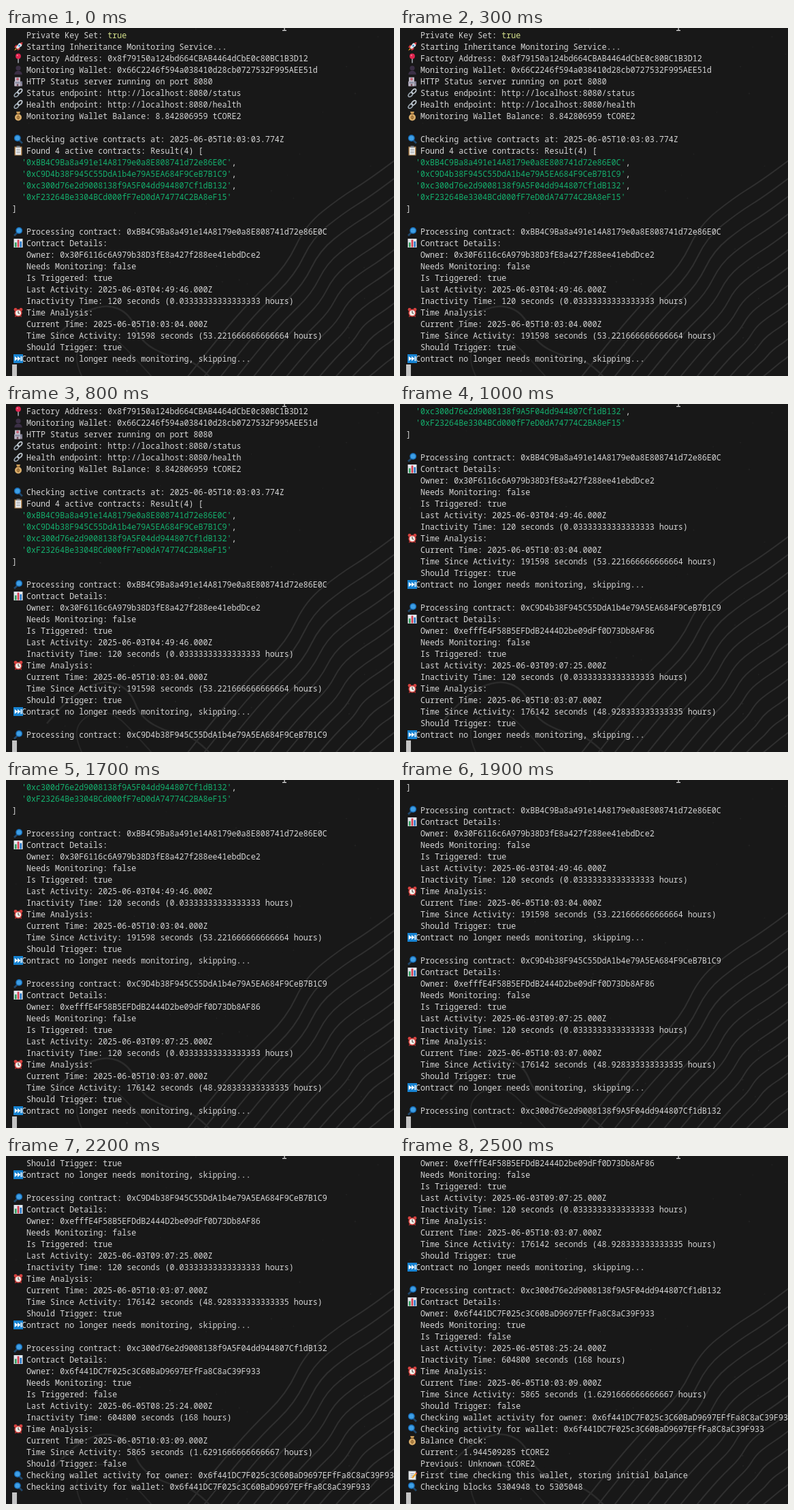
Write an HTML page with a canvas that moves like this. It is 570x512 px and loops after 2.6 s.

```html
<!DOCTYPE html>
<html lang="en">
<head>
<meta charset="utf-8">
<title>Monitoring service log</title>
<style>
html, body { margin: 0; height: 100%; overflow: hidden; background: #181818; }
canvas { display: block; }
</style>
</head>
<body>
<canvas id="stage" width="570" height="512"></canvas>
<script>
const ctx = document.getElementById('stage').getContext('2d');
const W = 570, H = 512, LOOP = 2600, ROW = 17, COL = 7.015, LEFT = 9, ROWS = 29;
const TEXT = '#d6d6d6', GREEN = '#14b06e', YELLOW = '#d6e28c';

// Shape helpers
function dot(color, x, y, r) {
  ctx.fillStyle = color;
  ctx.beginPath();
  ctx.arc(x, y, r, 0, 7);
  ctx.fill();
}
function box(color, x, y, w, h) {
  ctx.fillStyle = color;
  ctx.fillRect(x, y, w, h);
}
function poly(color, ...p) {
  ctx.fillStyle = color;
  ctx.beginPath();
  for (let i = 0; i < p.length; i += 2) ctx.lineTo(p[i], p[i + 1]);
  ctx.fill();
}
function ring(color, width, x, y, rx, ry = rx, turn = 0) {
  ctx.strokeStyle = color;
  ctx.lineWidth = width;
  ctx.beginPath();
  ctx.ellipse(x, y, rx, ry, turn, 0, 7);
  ctx.stroke();
}
function line(color, width, ...p) {
  ctx.strokeStyle = color;
  ctx.lineWidth = width;
  ctx.beginPath();
  for (let i = 0; i < p.length; i += 2) ctx.lineTo(p[i], p[i + 1]);
  ctx.stroke();
}
function smooth(color, width, pts) {
  ctx.strokeStyle = color;
  ctx.lineWidth = width;
  ctx.beginPath();
  ctx.moveTo(...pts[0]);
  for (let i = 1; i < pts.length - 1; i++) {
    const [x, y] = pts[i], [nx, ny] = pts[i + 1];
    const last = i === pts.length - 2;
    ctx.quadraticCurveTo(x, y, last ? nx : (x + nx) / 2, last ? ny : (y + ny) / 2);
  }
  ctx.stroke();
}

function lens(x, handleX) {
  line('#20486c', 2.8, x, 6, handleX, 13);
  dot('#1769b0', x, 5.5, 5);
  dot('#3e9fe6', x, 5.5, 3.6);
}
function sheet(paper, frame) {
  box(frame, 1.5, 1, 11, 13);
  box(paper, 3, 2.5, 8, 10.5);
  for (const y of [5, 7.5, 10]) line('#8a8f96', 0.9, 4.3, y, 9.7, y);
}

// Icons fill a 14 x 14 cell
const icons = {
  rocket() {
    poly('#d8343c', 4, 4, 1, 8, 5, 9, 6, 13, 10, 10);
    poly('#e4e6ea', 13, 1, 8, 2, 3.5, 8, 6, 10.5, 12, 6);
    poly('#d8343c', 13.5, 0.5, 9.5, 1.6, 12.4, 4.5);
    dot('#3a8dd0', 8.5, 5.5, 1.5);
    poly('#f5a623', 3.5, 9, 1, 13, 5, 10.5);
  },
  pin() {
    line('#a9b0b8', 1.5, 7, 6, 7, 14);
    dot('#e0244f', 7, 4, 3.9);
    dot('#f4819b', 5.8, 2.8, 1.1);
  },
  person() {
    dot('#3b2f45', 7, 4.5, 3.6);
    ctx.beginPath();
    ctx.arc(7, 14, 5.8, Math.PI, 0);
    ctx.fill();
  },
  hospital() {
    box('#8f8a9c', 1, 7, 12, 7);
    box('#bdb7c4', 2, 1, 8, 13);
    line('#c9566a', 1.5, 6, 1.8, 6, 5.8);
    line('#c9566a', 1.5, 4, 3.8, 8, 3.8);
    for (const x of [3, 5.2, 7.4, 10.8]) box('#5f6d88', x, 8, 1.4, 2);
    box('#6b4250', 4.8, 11, 2.4, 3);
  },
  link() {
    ring('#9ba7b2', 1.7, 4.6, 9.4, 4, 2.4, -0.8);
    ring('#c3ccd4', 1.7, 9.4, 4.6, 4, 2.4, -0.8);
  },
  money() {
    poly('#c79a58', 4, 0.5, 10, 0.5, 8.8, 4, 5.2, 4);
    dot('#d9ad6b', 7, 9, 5);
    line('#7d5526', 1.2, 4.8, 4, 9.2, 4);
    ring('#8b5f27', 1, 7, 9, 1.9);
    line('#8b5f27', 1, 7, 6, 7, 12);
  },
  find() { lens(5.8, 13); },
  inspect() { lens(8.2, 1); },
  clipboard() {
    sheet('#eceef0', '#b58a56');
    box('#7d858f', 4.5, 0, 5, 2.6);
  },
  chart() {
    box('#e2e8ee', 0.5, 0.5, 13, 13);
    box('#2f9e5b', 2, 6, 2.6, 7);
    box('#d83b4e', 5.7, 2, 2.6, 11);
    box('#2879c9', 9.4, 4.5, 2.6, 8.5);
  },
  alarm() {
    dot('#d3413f', 3, 2.7, 2.4);
    dot('#d3413f', 11, 2.7, 2.4);
    line('#a52c2c', 1.5, 4, 11, 2.3, 13.7);
    line('#a52c2c', 1.5, 10, 11, 11.7, 13.7);
    dot('#d3413f', 7, 7.7, 5.6);
    dot('#f0ece6', 7, 7.7, 4);
    line('#333', 1, 7, 4.8, 7, 7.9, 9, 8.8);
  },
  skip() {
    box('#1683d2', 0, 0.5, 14, 13);
    poly('#fff', 1.8, 3.5, 6.2, 7, 1.8, 10.5);
    poly('#fff', 6, 3.5, 10.4, 7, 6, 10.5);
    box('#fff', 10.6, 3.5, 1.5, 7);
  },
  memo() {
    sheet('#eceef0', '#d5d9dd');
    line('#f0a72b', 2.2, 12.8, 4.5, 7, 11);
    line('#d8485a', 2.2, 13.6, 3.6, 12.5, 4.8);
  }
};

// Log entries: [icon, text, starting column, colour, tail, tail colour]
const plain = text => [null, text];
const blank = plain('');
const wallets = [
  '0xBB4C9Ba8a491e14A8179e0a8E808741d72e86E0C',
  '0xC9D4b38F945C55DdA1b4e79A5EA684F9CeB7B1C9',
  '0xc300d76e2d9008138f9A5F04dd944807Cf1dB132',
  '0xF23264Be3304BCd000fF7eD0dA74774C2BA8eF15'
];
const owner = '0x6f441DC7F025c3C60BaD9697EFfFa8C8aC39F933';
const skipped = ['skip', 'Contract no longer needs monitoring, skipping...', 2];

function contract(id, holder, active, activity, limit, now, since) {
  return [
    blank,
    ['inspect', 'Processing contract: ' + id],
    ['chart', 'Contract Details:'],
    plain('Owner: ' + holder),
    plain('Needs Monitoring: ' + active),
    plain('Is Triggered: ' + !active),
    plain(`Last Activity: 2025-06-${activity}.000Z`),
    plain('Inactivity Time: ' + limit),
    ['alarm', 'Time Analysis:'],
    plain(`Current Time: 2025-06-05T10:03:${now}.000Z`),
    plain('Time Since Activity: ' + since),
    plain('Should Trigger: ' + !active)
  ];
}

const shortLimit = '120 seconds (0.03333333333333333 hours)';
const log = [
  [null, 'Private Key Set: ', 3, TEXT, 'true', YELLOW],
  ['rocket', 'Starting Inheritance Monitoring Service...'],
  ['pin', 'Factory Address: 0x8f79150a124bd664CBAB4464dCbE0c80BC1B3D12'],
  ['person', 'Monitoring Wallet: 0x66C2246f594a038410d28cb0727532F995AEE51d'],
  ['hospital', 'HTTP Status server running on port 8080'],
  ['link', 'Status endpoint: http://localhost:8080/status'],
  ['link', 'Health endpoint: http://localhost:8080/health'],
  ['money', 'Monitoring Wallet Balance: 8.842806959 tCORE2'],
  blank,
  ['find', 'Checking active contracts at: 2025-06-05T10:03:03.774Z'],
  ['clipboard', 'Found 4 active contracts: Result(4) ['],
  ...wallets.map((id, i) => [null, `'${id}'`, 2, GREEN, i < 3 ? ',' : '']),
  [null, ']', 0],
  ...contract(wallets[0], '0x30F6116c6A979b38D3fE8a427f288ee41ebdDce2', false,
    '03T04:49:46', shortLimit, '04', '191598 seconds (53.221666666666664 hours)'),
  skipped,
  ...contract(wallets[1], '0xefffE4F58B5EFDdB2444D2be09dFf0D73Db8AF86', false,
    '03T09:07:25', shortLimit, '07', '176142 seconds (48.928333333333335 hours)'),
  skipped,
  ...contract(wallets[2], owner, true,
    '05T08:25:24', '604800 seconds (168 hours)', '09', '5865 seconds (1.6291666666666667 hours)'),
  ['find', 'Checking wallet activity for owner: ' + owner],
  ['find', 'Checking activity for wallet: ' + owner],
  ['money', 'Balance Check:'],
  plain('Current: 1.944509285 tCORE2'),
  plain('Previous: Unknown tCORE2'),
  ['memo', 'First time checking this wallet, storing initial balance'],
  ['find', 'Checking blocks 5304948 to 5305048']
];

// [time in ms, lines printed so far]
const prints = [[0, 29], [800, 31], [1000, 42], [1800, 44], [2000, 56], [2400, 61]];

function drawBackdrop() {
  box('#181818', 0, 0, W, H);
  let seed = 7;
  const random = () => (seed = seed * 16807 % 2147483647) / 2147483647;
  for (let i = 0; i < 90; i++) dot('#222', random() * W, random() * H, 0.4 + random() * 0.8);

  // Contours blend from the wide outer curve into the corner
  const outer = [[572, 194], [535, 222], [490, 250], [440, 290], [412, 350], [360, 400], [310, 458], [266, 514]];
  const inner = [[572, 482], [566, 487], [560, 491], [554, 496], [548, 501], [542, 506], [537, 510], [532, 514]];
  for (let i = 0; i < 12; i++) {
    const k = i / 11;
    smooth('#2f2f2f', 2, outer.map(([x, y], j) =>
      [x + (inner[j][0] - x) * k, y + (inner[j][1] - y) * k]));
  }
  smooth('#2b2b2b', 2.5, [[60, 470], [95, 428], [145, 405], [182, 420], [198, 462], [240, 484], [275, 488], [300, 514]]);
  smooth('#272727', 2, [[112, 514], [98, 485], [118, 456], [155, 452], [185, 480], [215, 514]]);
}

function drawEntry([icon, text, col = 3, color = TEXT, tail = '', tailColor = TEXT], row) {
  const top = 2 + row * ROW, base = top + 13, x = LEFT + col * COL;
  if (icon) {
    ctx.save();
    ctx.translate(11, top + 1.5);
    icons[icon]();
    ctx.restore();
  }
  ctx.fillStyle = color;
  ctx.fillText(text, x, base);
  ctx.fillStyle = tailColor;
  ctx.fillText(tail, x + ctx.measureText(text).width, base);
}

function draw(count) {
  drawBackdrop();
  ctx.font = '500 11.69px "Noto Sans Mono", "DejaVu Sans Mono", monospace';
  log.slice(count - ROWS, count).forEach(drawEntry);
  box('#c4c4c4', LEFT, 2 + ROWS * ROW, COL, ROW);
  // Lower end of the mouse caret
  box('#e0e0e0', 408.5, 0, 1.2, 4);
  box('#e0e0e0', 406, 3, 6, 1.2);
}

let shown = 0;
function tick(now) {
  const t = now % LOOP;
  const count = prints.filter(([at]) => at <= t).pop()[1];
  if (count !== shown) draw(shown = count);
  requestAnimationFrame(tick);
}
requestAnimationFrame(tick);
</script>
</body>
</html>
```
